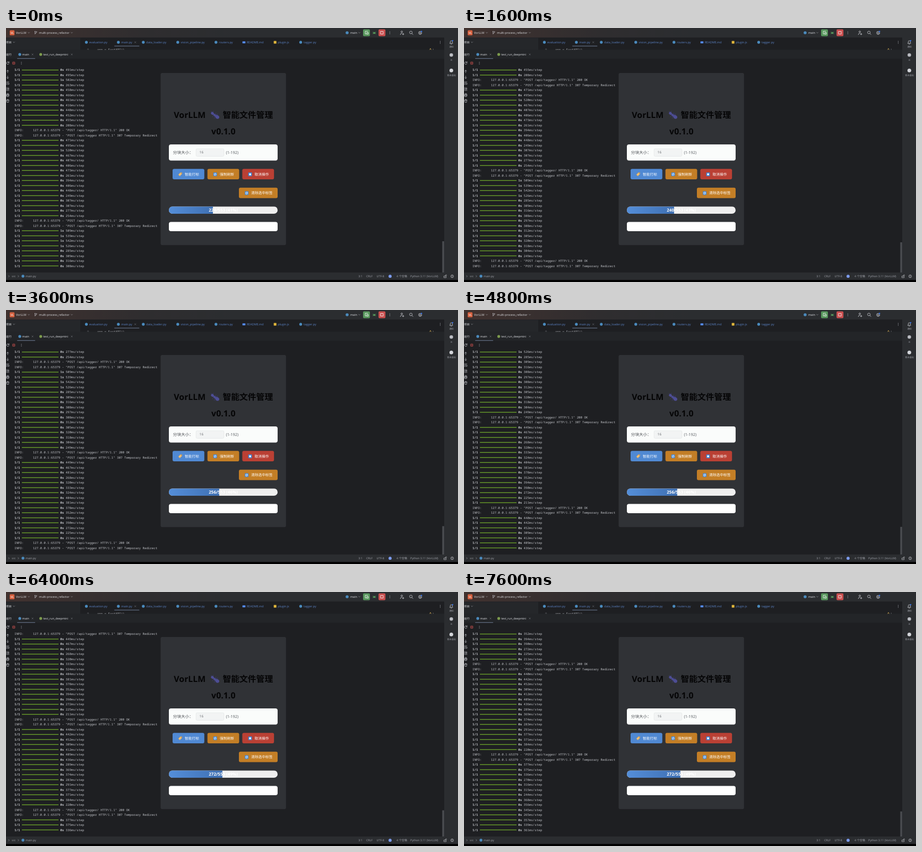
Write an HTML page that moves like this. It is 852 by 480 pixels and loops after 8000 ms.

```html
<!DOCTYPE html>
<html lang="zh">
<head>
<meta charset="utf-8">
<style>
html, body { margin: 0; width: 100%; height: 100%; overflow: hidden; background: #1e1f22; }
svg { display: block; width: 852px; height: 480px; text-rendering: geometricPrecision; }
text { white-space: pre; }
</style>
</head>
<body>
<svg id="stage" viewBox="0 0 852 480" xmlns="http://www.w3.org/2000/svg">
  <defs>
    <linearGradient id="title"><stop offset="0" stop-color="#41322f"/><stop offset=".3" stop-color="#2f2d2f"/><stop offset=".5" stop-color="#2b2d30"/></linearGradient>
    <linearGradient id="fill"><stop offset="0" stop-color="#548ed9"/><stop offset="1" stop-color="#3f70b3"/></linearGradient>
    <clipPath id="logClip"><rect x="12" y="74.5" width="812" height="380"/></clipPath>
    <clipPath id="codeClip"><rect x="140" y="35" width="686" height="6.3"/></clipPath>
    <clipPath id="barClip"><rect x="307" y="337.3" width="205" height="13.8" rx="6.9"/></clipPath>
  </defs>
</svg>
<script>
const NS = 'http://www.w3.org/2000/svg';
const stage = document.getElementById('stage');
const UI = "'Open Sans','Noto Sans CJK SC','Noto Sans CJK',sans-serif";
const APP = "'Noto Sans','Noto Sans CJK SC','Noto Sans CJK',sans-serif";
const MONO = "'Noto Sans Mono','DejaVu Sans Mono',monospace";
const GRAY = '#ced0d6', DIM = '#a0a3aa', BLUE = '#5b82c4', PY = '#4b8bbe';

function el(tag, attrs, parent = stage) {
  const e = document.createElementNS(NS, tag);
  for (const k in attrs) e.setAttribute(k, attrs[k]);
  parent.appendChild(e);
  return e;
}
const box = (x, y, w, h, fill, r = 0, parent) => el('rect', { x, y, width: w, height: h, fill, rx: r }, parent);
const dot = (cx, cy, r, fill, parent) => el('circle', { cx, cy, r, fill }, parent);
const line = (d, stroke = GRAY, w = 0.7, parent) =>
  el('path', { d, stroke, fill: 'none', 'stroke-width': w, 'stroke-linecap': 'round', 'stroke-linejoin': 'round' }, parent);
// y is the optical middle of the text
function label(x, y, s, size = 5.5, fill = GRAY, o = {}, parent) {
  const e = el('text', {
    x, y: y + size * 0.35, fill, 'font-size': size, 'font-family': o.font || UI,
    'font-weight': o.weight || 400, 'text-anchor': o.anchor || 'start'
  }, parent);
  e.textContent = s;
  return e;
}
const chevron = (x, y) => line(`M${x - 1.5} ${y - 0.8}l1.5 1.5 1.5-1.5`, DIM, 0.6);
const cross = (x, y) => line(`M${x - 1.2} ${y - 1.2}l2.4 2.4m0-2.4l-2.4 2.4`, '#85888f', 0.5);
const dots = (x, y) => [-2, 0, 2].forEach(d => dot(x, y + d, 0.5, GRAY));

function frameBars() {
  box(0, 0, 852, 480, '#1e1f22');
  box(0, 0, 852, 18, 'url(#title)');
  box(0, 18.5, 140, 22.5, '#25272a');
  box(0, 41, 826, 17, '#232528');
  box(826, 18, 26, 444, '#2b2d30');
  box(0, 462, 852, 14.3, '#2b2d30');
  box(0, 476.2, 852, 3.8, '#000');
}

function titleBar() {
  box(7, 4.3, 9, 9.4, '#d4603f', 1.5);
  label(11.5, 9, 'VL', 4.8, '#fff', { weight: 600, anchor: 'middle' });
  label(18.7, 9, 'VorLLM', 5.5, '#dfe1e5');
  chevron(43, 9);
  line('M54.8 6.8v4.6M57.6 7.6v.6q0 1.6-2.8 1.8');
  dot(54.8, 6.6, 0.8, GRAY); dot(57.6, 7, 0.8, GRAY);
  label(62.3, 9, 'multi-process_refactor', 5.48, '#dfe1e5');
  chevron(124, 9);

  dot(643, 9, 2.8, PY);
  label(649, 9, 'main', 5.5, '#dfe1e5');
  chevron(666, 9);
  box(673, 2.5, 13, 13, '#57965c', 2);
  line('M681.8 6.2h-4.6v5h2M680.4 8.6h2.6v3h-2.6z', '#fff', 0.8);
  dot(694.2, 9.3, 1.9, '#57965c');
  line('M691.4 7.2l5.6 4.2m0-4.2l-5.6 4.2M691.2 9.3h6', '#57965c', 0.6);
  box(702.2, 2.5, 13, 13, '#c94f4f', 2);
  line('M706.3 6.6h4.8v4.8h-4.8z', '#fff', 0.8);
  dots(723.5, 9);
  el('circle', { cx: 746, cy: 7.2, r: 1.5, fill: 'none', stroke: GRAY, 'stroke-width': 0.8 });
  line('M743.2 12.6q0-2.6 2.8-2.6m2.6 0v3m-1.5-1.5h3', GRAY, 0.8);
  el('circle', { cx: 763.2, cy: 8.4, r: 2.5, fill: 'none', stroke: GRAY, 'stroke-width': 0.8 });
  line('M765.1 10.4l2 2', GRAY, 0.8);
  el('circle', { cx: 780.7, cy: 9.2, r: 2.7, fill: 'none', stroke: GRAY, 'stroke-width': 1.1, 'stroke-dasharray': '1.9 .4' });
  dot(780.7, 9.2, 1, GRAY);
  dot(783.2, 6.6, 1.3, '#3574f0');
}

function editorTabs() {
  label(0, 27.2, '项目', 5.2, '#dfe1e5', { weight: 500 });
  chevron(15, 27);
  const tabs = [[157, 'evaluation.py'], [217.3, 'main.py'], [264.3, 'data_loader.py'], [329.3, 'vision_pipeline.py'],
    [401.3, 'routers.py'], [453.7, 'README.md'], [512.3, 'plugin.js'], [561, 'tagger.py']];
  for (const [x, name] of tabs) {
    const ext = name.split('.')[1];
    if (ext === 'py') dot(x - 5.5, 27, 2.7, PY);
    else if (ext === 'js') box(x - 7.6, 24.6, 5, 5, '#e0b63c', 0.6);
    else box(x - 8, 25.3, 5.6, 3.6, '#548af7', 0.4);
    label(x, 27, name, 5.5, BLUE);
  }
  cross(243.6, 27);
  box(204, 33.4, 47.5, 1.4, '#5f6b80', 0.7);
  dots(818.5, 27);

  const code = el('g', { 'clip-path': 'url(#codeClip)' });
  label(153, 40.6, '9', 5.75, '#6f737a', { font: MONO }, code);
  label(171.8, 40.6, 'app = FastAPI()', 5.75, '#bcbec4', { font: MONO }, code);
  line('M797.8 42.6l2.2-4 2.2 4z', '#d6ae58', 0.8, code);
  label(804, 41, '1', 5, DIM, {}, code);
}

function runHeader() {
  label(0, 50, '运行', 5.2, '#dfe1e5', { weight: 500 });
  dot(26, 50, 2.7, PY);
  label(30.6, 50, 'main', 5.5, '#dfe1e5');
  cross(50, 50);
  box(21, 57, 34, 1.3, '#5f6b80', 0.6);
  dot(65.5, 50, 2.7, '#7c9a4c');
  label(70.2, 50, 'test_run_deepmini', 5.4, '#dfe1e5');
  cross(124, 50);
  line('M5.6 65.2a2.4 2.4 0 1 0 .1 2M5.8 63.6v1.8h-1.8');
  el('rect', { x: 12.4, y: 64.2, width: 4.4, height: 4.4, rx: 0.7, fill: '#5e2f31', stroke: '#c25450', 'stroke-width': 0.7 });
  dots(29, 66.5);

  line('M3.2 84.4v-4.6m-1.6 1.6l1.6-1.6 1.6 1.6');
  line('M3.2 90.8v4.6m-1.6-1.6l1.6 1.6 1.6-1.6');
  line('M.8 102h4.8M.8 104.3h4q1.2 0 1.2 1.1t-1.2 1.1h-1.6M.8 106.5h1');
  line('M.8 113.2h2.4M.8 115.4h2.4M.8 117.8h5M4.8 112.6v3.2m-1.1-1l1.1 1 1.1-1');
  line('M1.8 125.6v-1.6h3v1.6M1 128.4v-2.8h4.6v2.8M1.8 127.2h3v2.2h-3z');
  line('M.8 136.2h5M2.4 136v-.9h1.8v.9M1.4 136.4l.3 4h3.2l.3-4');
}

function sideAndStatus() {
  line('M836.6 29h5.6l-.8-1.2v-1.6q0-2.2-2-2.2t-2 2.2v1.6zM838.7 30.4h1.4', GRAY, 0.8);
  dot(841.9, 24, 1.2, '#3574f0');
  const side = (y, s) => label(839.6, y, s, 4.2, DIM, { anchor: 'middle' });
  side(35.2, '通知');
  dot(839.4, 51, 3.3, '#b9bbc1');
  side(60.2, 'AI');
  dot(839.4, 80.3, 3.5, '#d3d5da');
  side(89.5, '青禾语码');

  const sep = x => line(`M${x - 0.7} 467.7l1.4 1.5-1.4 1.5`, DIM, 0.6);
  sep(5.5);
  label(11, 469, 'src', 5.2, DIM);
  sep(23.3);
  dot(32, 469, 2.7, PY);
  label(37, 469, 'main.py', 5.3, DIM);
  [[664.3, '3:1'], [679, 'CRLF'], [698.6, 'UTF-8'], [736, '4 个空格'], [762, 'Python 3.11 (VorLLM)']]
    .forEach(([x, s]) => label(x, 469, s, 5.3, DIM));
  dot(724, 469.2, 2.9, '#7d9cf0');
  line('M825.8 468.8h3.8v3h-3.8zM828.4 468.6v-1q0-1.2 1.1-1.2t1.1 1.2', GRAY, 0.7);
  el('circle', { cx: 841, cy: 469.2, r: 2.6, fill: 'none', stroke: GRAY, 'stroke-width': 0.7 });
  line('M841 467.7v1.7m0 1.1v.1', GRAY, 0.7);
}

// Step times in ms, one batch per line; a pair of request lines follows each batch
const BATCHES = `491 495 502 263 458 466 461 416 448 452 455 208
471 495 520 467 407 406 473 261 394 406 448 249 307 307 277 254
509 539 542 526 285 309 316 308 297 308 312 305 320 318 304 249
449 467 481 268 320 333 324 404 381 378 352 394 390 272 225 211
440 442 452 309 412 409 436 289 369 374 283 291 377 371 384 220
377 375 336 270 316 315 244 368 356 345 265 357 339 361`.split('\n').map(b => b.split(' '));
const PITCH = 9.49, CH = 3.45;

function buildLog() {
  const clip = el('g', { 'clip-path': 'url(#logClip)' });
  const log = el('g', {}, clip);
  let row = 0;
  const put = (col, s, weight) =>
    label(16 + col * CH, 79.4 + row * PITCH, s, 5.75, '#c3c5ca', { font: MONO, weight }, log);
  BATCHES.forEach((batch, i) => {
    for (const ms of batch) {
      put(0, '1/1', 700);
      box(30, 78.7 + row * PITCH, 69, 1.5, '#64962a', 0, log);
      put(25, ms >= 500 ? '1s' : '0s', 700);
      put(28, ms + 'ms/step', 500);
      row++;
    }
    if (i === BATCHES.length - 1) return;
    for (const tail of ['/ HTTP/1.1" 200 OK', ' HTTP/1.1" 307 Temporary Redirect']) {
      put(0, 'INFO:');
      put(10, '127.0.0.1:65379 - "POST /api/tagger' + tail);
      row++;
    }
  });
  return log;
}

function syncIcon(x, y) {
  box(x - 3.4, y - 3.4, 6.8, 6.8, '#3f86d6', 1);
  line(`M${x - 1.9} ${y + 0.2}v-1.6h3.4m-1-1l1 1-1 1M${x + 1.9} ${y - 0.2}v1.6h-3.4m1-1l-1 1 1 1`, '#fff', 0.7);
}

function button(x, y, w, fill, tx, s) {
  box(x, y, w, 19.8, fill, 3);
  label(tx, y + 10, s, 6.75, '#fff', { weight: 500, font: APP });
}

function panel() {
  box(291.5, 85, 236.3, 325.3, '#303236', 3);
  const head = { font: APP, weight: 700 };
  label(316.3, 164.3, 'VorLLM', 15.9, '#050506', head);
  label(408.4, 164.3, '智能文件管理', 15.8, '#050506', head);
  label(409.8, 195, 'v0.1.0', 15.9, '#050506', { ...head, anchor: 'middle' });
  line('M391.5 164l-2 4M394 166l-1.5 5M396 166.5l0 5M393 163l3-2.5M395 164l4-1.5M388 159.5l-1.5-2M390 159l1-2', '#3f3f7c', 0.7);
  [[389.2, 161.4, 3, 2.5], [393.6, 164.8, 3, 2], [398.2, 168, 4, 3.2]].forEach(([cx, cy, rx, ry]) =>
    el('ellipse', { cx, cy, rx, ry, fill: '#4d4d94', transform: `rotate(38 ${cx} ${cy})` }));

  box(307, 220, 205, 30.6, '#fafcfb', 4);
  label(314.8, 235.6, '分块大小：', 7.6, '#44474c', { font: APP });
  el('rect', { x: 358.3, y: 228.2, width: 52.4, height: 14.3, rx: 2, fill: '#f2f4f4', stroke: '#dfe2e3', 'stroke-width': 0.6 });
  label(364.8, 235.2, '16', 6.4, '#6a6d72', { font: APP });
  label(414.5, 235.6, '(1-192)', 7.4, '#5d6166', { font: APP });

  button(314, 266.3, 59.8, '#5089d3', 337, '智能打标');
  button(379.7, 266.3, 59.8, '#c37e26', 403, '强制刷新');
  button(445.4, 266.3, 59.8, '#ba4034', 468.6, '取消操作');
  button(439, 301.8, 73, '#c37e26', 462, '清除选中标签');
  el('path', { d: 'M324.8 277.2l3.6-4 3.2-.1.1 2.7-4 4.1z', fill: '#f0c277', stroke: '#b98a4a', 'stroke-width': 0.4 });
  dot(330.3, 274.4, 0.6, '#8b5d33');
  syncIcon(394.2, 276.5);
  syncIcon(453.6, 312);
  box(456.7, 273.1, 6.8, 6.8, '#3f86d6', 1);
  box(458.4, 274.8, 3.4, 3.4, '#fff', 0.3);

  box(307, 366.4, 205, 17.6, '#fff', 4);
  const bar = el('g', { 'clip-path': 'url(#barClip)' });
  box(307, 337.3, 205, 13.8, '#efefef', 0, bar);
  return {
    fill: box(307, 337.3, 80, 13.8, 'url(#fill)', 0, bar),
    text: label(409.6, 344.3, '', 8, '#fff', { font: APP, weight: 700, anchor: 'middle' }, bar)
  };
}

frameBars();
titleBar();
editorTabs();
runHeader();
sideAndStatus();
const log = buildLog();
const thumb = box(822.4, 403, 3.4, 59, '#4b4d51');
const progress = panel();

// Rows scrolled at each 400 ms tick
const SCROLL = [0, 2, 5, 8, 10, 13, 16, 19, 22, 28, 30, 32, 35, 38, 41, 46, 49, 53, 56, 60];
const TOTAL = 553;

function draw(ms) {
  const n = SCROLL[Math.floor(ms % 8000 / 400)];
  log.setAttribute('transform', `translate(0 ${-n * PITCH})`);
  const top = 403 + n * 0.195;
  thumb.setAttribute('y', top);
  thumb.setAttribute('height', 462 - top);
  // a batch of 16 completes every 18 rows
  const done = 224 + 16 * Math.floor((n + 8) / 18);
  progress.fill.setAttribute('width', 205 * done / TOTAL);
  progress.text.textContent = `${done}/${TOTAL} (${Math.round(done / TOTAL * 100)}%)`;
}

function tick() {
  draw(performance.now());
  requestAnimationFrame(tick);
}
tick();
</script>
</body>
</html>
```
